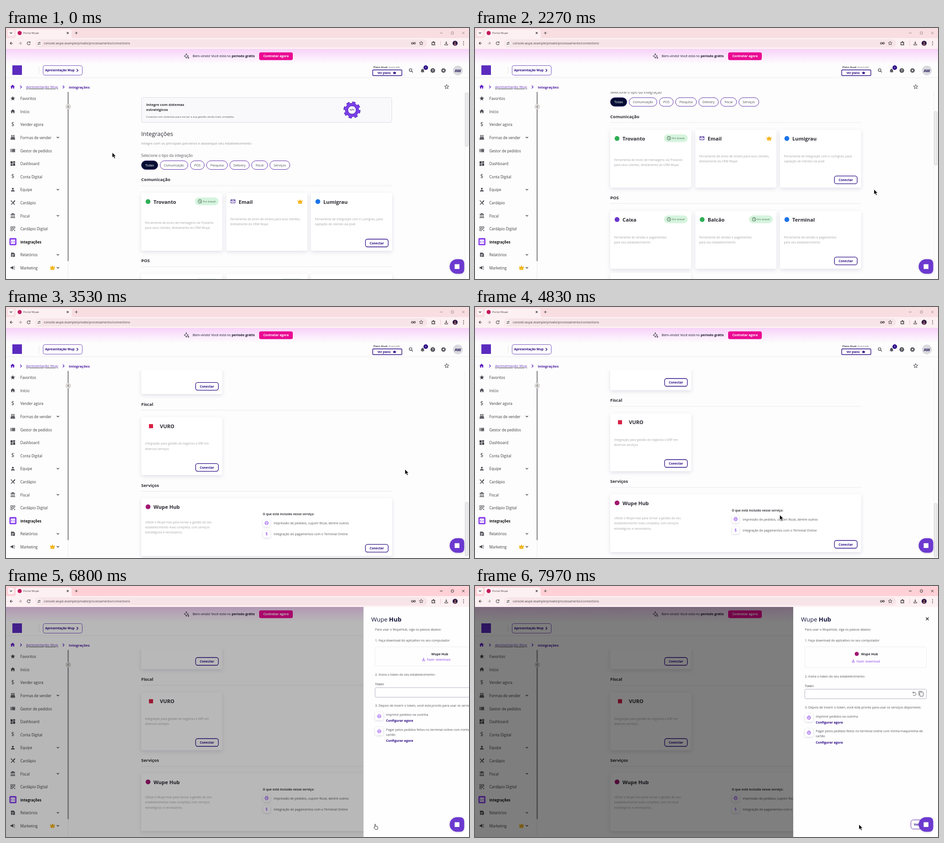
An HTML page that plays this animation: 1017 by 551 pixels, repeating every 8000 ms.

```html
<!DOCTYPE html>
<html lang="pt-BR">
<head>
<meta charset="utf-8">
<title>Integrações</title>
<style>
  html, body { margin: 0; width: 100%; height: 100%; overflow: hidden; }
  svg { display: block; font-family: "Open Sans", "Noto Sans", sans-serif; }
  #stage { width: 1017px; height: 551px; }
  text { white-space: pre; }
  .card { filter: drop-shadow(0 3px 4px #2a206022); }
  .soft { filter: drop-shadow(0 1px 2px #2a206033); }
</style>
</head>
<body>
<svg id="stage" viewBox="0 0 1017 551"></svg>
<script>
const INK = '#2b2b33', GREY = '#55555c', PALE = '#a5a5aa', PURPLE = '#6a35c9', NAVY = '#2c0a85', VIOLET = '#8b45ee';

// y is the visual middle of the text
const text = (x, y, s, size, fill = INK, weight = 400, anchor = 'start') =>
  `<text x="${x}" y="${y + size * .36}" font-size="${size}" fill="${fill}" font-weight="${weight}" text-anchor="${anchor}">${s}</text>`;
const rect = (x1, y1, x2, y2, r, fill, stroke = 'none', w = 1, more = '') =>
  `<rect x="${x1}" y="${y1}" width="${x2 - x1}" height="${y2 - y1}" rx="${r}" fill="${fill}" stroke="${stroke}" stroke-width="${w}" ${more}/>`;
const disc = (x, y, r, fill, more = '') => `<circle cx="${x}" cy="${y}" r="${r}" fill="${fill}" ${more}/>`;
const ring = (x, y, r, stroke, w = 1, more = '') => disc(x, y, r, 'none', `stroke="${stroke}" stroke-width="${w}" ${more}`);
const line = (d, stroke = INK, w = 1, more = '') =>
  `<path d="${d}" fill="none" stroke="${stroke}" stroke-width="${w}" ${more}/>`;
// 24-unit glyph centred on x, y
const icon = (name, x, y, size = 11, fill = '#46464d', more = '') =>
  `<path d="${glyphs[name]}" fill="${fill}" fill-rule="evenodd" transform="translate(${x - size / 2} ${y - size / 2}) scale(${size / 24})" ${more}/>`;
const outline = (name, x, y, size, stroke) => icon(name, x, y, size, 'none', `stroke="${stroke}" stroke-width="2.2"`);
const down = (x, y) => line(`M${x - 2.5} ${y - 1.3}l2.5 2.5 2.5-2.5`, '#333', 1.2);
const right = (x, y, c, w = 1.3) => line(`M${x - 1.3} ${y - 3}l3 3-3 3`, c, w);
const cross = (x, y, r, c, w) => line(`M${x - r} ${y - r}l${2 * r} ${2 * r}m0 ${-2 * r}l${-2 * r} ${2 * r}`, c, w);
const cog = (x, y, r, c) => disc(x, y, r * .82, c) +
  ring(x, y, r * .85, c, r * .3, `stroke-dasharray="${r * .37} ${r * .2976}"`);

const glyphs = {
  star: 'M12 17.3L18.2 21l-1.7-7L22 9.2l-7.2-.6L12 2 9.2 8.6 2 9.2 7.5 14 5.8 21z',
  home: 'M10 20v-6h4v6h5v-8h3L12 3 2 12h3v8z',
  till: 'M5 2h14v7H5zM8 4v3h8V4zM4 11h16l2 7H2zM2 19h20v3H2z',
  list: 'M2 5h4v4H2zM8 5h14v4H8zM2 10h4v4H2zM8 10h14v4H8zM2 15h4v4H2zM8 15h14v4H8z',
  dash: 'M2 13h9V2H2zM2 22h9v-7H2zM13 22h9V11h-9zM13 2v7h9V2z',
  person: 'M12 12a4 4 0 1 0 0-8 4 4 0 0 0 0 8zM4 20v-2c0-3 5-4 8-4s8 1 8 4v2z',
  fork: 'M2 4l3-2 8 9c1-4 5-9 8-9s1 6-6 11l6 7-2 2-7-7-7 7-2-2 8-8z',
  bank: 'M4 10v7h3v-7zM10.5 10v7h3v-7zM17 10v7h3v-7zM2 22h20v-3H2zM12 1L2 6v2h20V6z',
  tiles: 'M2 2h9v9H2zM4 4v5h5V4zM13 2h9v9h-9zM15 4v5h5V4zM2 13h9v9H2zM4 15v5h5v-5zM13 13h4v4h-4zM18 18h4v4h-4z',
  doc: 'M4 3h12l5 5v13H4zM7 9v2h10V9zM7 13v2h10v-2zM7 17v2h6v-2z',
  horn: 'M2 9h5l7-5v16l-7-5H2zM17 11h5v2h-5zM16 7l4-3 1 2-4 3zM17 16l4 3-1 2-4-3z',
  crown: 'M2 5l5 6 5-8 5 8 5-6-2 12H4zM4 18h16v3H4z',
  bell: 'M12 22l3-3H9zM19 16v-5c0-4-2-6-5-7V2h-4v2c-3 1-5 3-5 7v5l-2 2h18z',
  mail: 'M2 4h20v16H2zM4 8v10h16V8l-8 5zM4 6l8 5 8-5z',
  print: 'M6 2h12v5H6zM8 4v3h8V4zM2 8h20v9h-4v5H6v-5H2zM4 10v5h2v-2h12v2h2v-5zM8 15v5h8v-5z',
  save: 'M10.5 2h3v8H18l-6 6-6-6h4.5zM3 15h2.5v4h13v-4H21v7H3z',
  piece: 'M3 6h6c0-5 6-5 6 0h5v6c-4 0-4 4 0 4v5H3zM6 9v9h11v-1c-4-2-4-5 0-7V9z'
};

const button = (x, y) => rect(x, y, x + 50, y + 17, 4.5, '#fff', NAVY, 1.3) +
  text(x + 25, y + 8.7, 'Conectar', 7, NAVY, 700, 'middle');
const bubble = (x, y, r = 8) => `<g class="soft">${rect(x - r, y - r, x + r, y + r, 4, '#fff')}</g>`;
const soon = (x, y) => rect(x, y, x + 52, y + 17, 8.5, '#d5f4dd') + ring(x + 11, y + 8.5, 4, '#3f5a48') +
  line(`M${x + 11} ${y + 6}v3l2 1`, '#3f5a48', .9) + text(x + 18, y + 8.7, 'Em breve!', 6, '#4a6b55');

function browser() {
  const c = '#443c40';
  return rect(0, 0, 1017, 23, 0, '', 'none', 0, 'id="strip"') + rect(0, 22, 1017, 46, 0, '#fdf0f2') +
    rect(4, 4, 18, 18, 4, '#fdf0f2') + down(11, 11) +
    '<path d="M17 22q4 0 4-4V8q0-5 5-5h113q5 0 5 5v10q0 4 4 4z" fill="#fdf0f2"/>' +
    disc(30, 11, 4.5, '#c2185b') + text(38, 11.3, 'Portal Wupe', 6, c) +
    cross(135.5, 11, 2, c, 1.1) + line('M151.5 11h6m-3-3v6', c) +
    '<g id="controls">' + line('M953 11h6', '#222') + rect(978, 8.5, 983, 13.5, 1, 'none', '#222') + cross(1004.5, 11, 2.5, '#222', 1) + '</g>' +
    line('M15 33.5h-6m3-3l-3 3 3 3', c, 1.1) + line('M28 33.5h6m-3-3l3 3-3 3', '#aa9ca0', 1.1) +
    line('M52.5 31.5a3.4 3.4 0 1 0 .6 3m0-5v2.5h-2.5', c, 1.1) +
    rect(64, 25, 925, 42.5, 8.7, '#f6e4e8') + disc(72.5, 33.5, 6, '#fff5f6') +
    line('M69.5 32h3m2.5 0h1m-6.5 3.5h1m2.5 0h3', c) + ring(73.8, 32, 1.1, c, .9) + ring(71.2, 35.5, 1.1, c, .9) +
    text(83, 33.6, 'console.wupe.example/private/processamento/connections', 6.8, '#4a4347') +
    ring(892.5, 33.5, 2, c, 1.2) + ring(897.5, 33.5, 1.8, c, 1.2) + line('M894 33.5h3', c, 1.2) +
    outline('star', 912, 33.3, 10, c) + icon('piece', 939, 33.5, 11, c) + line('M954.5 28v11', '#e6c9cf') +
    icon('save', 967, 33.5, 10, c) + disc(986.5, 33.5, 5.5, '#2a1540') + disc(986.5, 32, 1.7, '#8c5a62') +
    '<path d="M983.5 38q0-4 3-4t3 4z" fill="#8c5a62"/>' +
    [30, 33.5, 37].map(y => disc(1005, y, .9, c)).join('');
}

function header() {
  return rect(0, 46, 1017, 79, 0, 'url(#promo)') +
    line('M396 56q.6 5 5 5.5-4.4.6-5 5-.6-4.400-5-5 4.400-.5 5-5.5zM400.5 63.5v4m-2-2h4', INK, 1) +
    text(410, 61.7, 'Bem-vindo! Você está no <tspan font-weight="700">período grátis</tspan>', 7.3, '#17172b') +
    rect(556, 53.5, 630, 70.5, 4, '#ea0a92') + text(593, 61.8, 'Contratar agora', 7, '#fff', 700, 'middle') +
    rect(14, 82, 35, 103, 0, '#5b2bbf') + line('M72.5 85v16', '#e4e4e8') +
    rect(81.5, 82.5, 167.5, 103.5, 4, '#fdfdfd', '#7a52c0') + text(86, 93, 'Apresentação Wup', 6.9, NAVY, 700) + right(156.5, 93, NAVY) +
    text(807, 86, '<tspan font-weight="600">Plano Atual:</tspan> <tspan fill="#777">Avançado</tspan>', 5.5) +
    rect(805.5, 92, 869.5, 104.5, 1.5, '#fff', NAVY, 1.4) + text(816, 98.4, 'Ver plano', 6.1, NAVY, 700) + icon('crown', 853.5, 98, 8, NAVY) +
    ring(888.7, 92.3, 2.9, GREY, 1.4) + line('M890.7 94.5l3 3', GREY, 1.6) +
    icon('bell', 915, 94, 11, GREY) + disc(922, 87, 5, NAVY) + text(922, 87, '1', 6, '#fff', 600, 'middle') +
    disc(937.5, 93.3, 5.1, GREY) + text(937.5, 93.5, '?', 7.5, '#fff', 700, 'middle') +
    cog(961, 93.3, 5.2, GREY) + disc(961, 93.3, 1.7, '#fdfdfd') +
    disc(992.5, 93.3, 10.7, '#dbd9de') + text(992.5, 93.5, 'AW', 8.8, '#1d1658', 700, 'middle') +
    line('M0 109h1017', '#ececee') + icon('home', 14.5, 129, 12, '#5d1fc0') + right(32.5, 129.5, '#5d1fc0') +
    '<g text-decoration="underline">' + text(44, 129.5, 'Apresentação Wup', 8, '#6d3cc0') + '</g>' +
    right(126, 129.5, '#5d1fc0') + text(138, 129.7, 'Integrações', 7.85, '#4b1a9c', 700) + outline('star', 968, 128.8, 11, GREY);
}

function sidebar() {
  // label, glyph, has submenu
  const items = [['Favoritos', 'star'], ['Início', 'home'], ['Vender agora', '$'], ['Formas de vender', 'till', 1],
    ['Gestor de pedidos', 'list'], ['Dashboard', 'dash'], ['Conta Digital', '$'], ['Equipe', 'person', 1], ['Cardápio', 'fork'],
    ['Fiscal', 'bank', 1], ['Cardápio Digital', 'tiles'], ['Integrações', ''], ['Relatórios', 'doc', 1], ['Marketing', 'horn', 1], ['', 'person']];
  return line('M136.5 140v411', '#e9e9ec') + rect(135, 140, 138, 512, 1.5, '#a2a2a6') +
    disc(136.7, 172.7, 6, '#dcd9d6') + line('M138 170l-2.5 2.7 2.5 2.7', '#333') +
    items.map(([label, glyph, sub], i) => {
      const y = 155 + i * 28.6;
      const mark = glyph == '$' ? text(15, y - .5, '$', 12, '#46464d', 400, 'middle') : glyph ? icon(glyph, 15, y - .5, 12) :
        rect(7.5, y - 8.5, 23, y + 7.5, 2.5, VIOLET) + rect(10.5, y - 5, 20, y + 4.5, 1, '#fff') +
        line(`M14 ${y - 2.5}l-2 2.3 2 2.3m2.5-4.6l2 2.3-2 2.3`, VIOLET, 1.1);
      return mark + text(31.5, y + .3, label, glyph ? 8.1 : 7.9, glyph ? '#3d3d44' : '#111', glyph ? 400 : 700) + (sub ? down(114, y - .5) : '');
    }).join('') + icon('crown', 102, 526, 13, '#f2b010');
}

const heading = (h, s) => text(297, h, s, 9.5, INK, 700) + line(`M297 ${h + 13}h551`, '#e8e8ec');
function card(x, y, title, desc, o = {}) {
  const w = o.wide ? 551 : 178, first = o.at || 58;
  const logo = o.square ? rect(x + 17, y + 15, x + 26, y + 24, 0, '#d81f45') :
    o.dot ? disc(x + (o.gap ? 22 : 15), y + 19, o.gap ? 7 : 5.3, o.dot) : icon('mail', x + 14.5, y + 18.5, 12, NAVY);
  return `<g class="card">${rect(x, y, x + w, y + 127, 4, '#fff')}</g>` + logo +
    text(x + (o.gap || 27), y + 19.7, title, 11.2, INK, 700) +
    desc.map((s, i) => text(x + 8.5, y + first + i * 11.1, s, 6.65, PALE)).join('') +
    (o.link ? button(x + w - 58.5, y + 101.5) : '') + (o.soon ? soon(x + 118, y + 10) : '') +
    (o.crown ? icon('crown', x + 162, y + 19, 13, '#f2b010') : '');
}

function content() {
  const chips = [[297, 334, 'Todas'], [338, 400, 'Comunicação'], [404.5, 436, 'POS'], [440, 487, 'Pesquisa'],
    [491, 535, 'Delivery'], [539, 575, 'Fiscal'], [579, 624, 'Serviços']];
  const A = 297, B = 484, C = 670, pay = ['Ferramenta de vendas e pagamentos', 'para seu estabelecimento'];
  const red = '#d81f45', hub = '#a01870';
  return rect(A + .5, 152.5, 847.5, 207.5, 4, '#f9f9fb', '#dddde5') +
    text(308, 168.3, 'Integre com sistemas', 7.85, INK, 700) + text(308, 179.6, 'estratégicos', 7.85, INK, 700) +
    text(308, 194.5, 'Conecte com sistemas para tornar a sua gestão ainda mais completa', 6, GREY) +
    cog(760, 180, 18.6, '#4d1fae') + cog(760, 180, 17.5, '#7a3fe8') + disc(760, 180, 9, '#fff', 'stroke="#4d1fae"') +
    text(760, 179.7, '&lt;/&gt;', 7, '#33216b', 700, 'middle') +
    text(A, 232.2, 'Integrações', 12.9, INK, 500) +
    text(A, 253.5, 'Integre com os principais parceiros e alavanque seu estabelecimento', 7.55, '#98989d') +
    text(A, 279.8, 'Selecione o tipo da integração', 8.1, GREY) +
    chips.map(([a, b, s], i) => rect(a + .5, 291.5, b - .5, 310.5, 9.5, i ? '#fff' : '#050d33', i ? '#5f2fa8' : '#33246e') +
      text((a + b) / 2, 301.3, s, 7, i ? '#4b4b52' : '#fff', 400, 'middle')).join('') +
    heading(333, 'Comunicação') +
    card(A, 362, 'Trovanto', ['Ferramenta de envio de mensagens via Trovanto', 'para seus clientes, diretamente do CRM Wupe'], { dot: '#2fae55', soon: 1, at: 66 }) +
    card(B, 362, 'Email', ['Ferramenta de envio de emails para seus clientes,', 'diretamente do CRM Wupe'], { crown: 1 }) +
    card(C, 362, 'Lumigrau', ['Ferramenta de integração com o Lumigrau, para', 'captação de clientes via pixel'], { dot: '#1b74e8', link: 1 }) +
    heading(511, 'POS') +
    card(A, 540, 'Caixa', pay, { dot: PURPLE, soon: 1 }) + card(B, 540, 'Balcão', pay, { dot: '#2fae55', soon: 1 }) +
    card(C, 540, 'Terminal', pay, { dot: '#1b74e8', link: 1 }) + card(A, 676, 'Totem', pay, { dot: '#e08a1e', link: 1 }) +
    heading(825, 'Pesquisa') +
    card(A, 853, 'Satisfação', ['Ferramenta de pesquisa de satisfação do cliente.'], { dot: PURPLE, link: 1, at: 47 }) +
    text(305.5, 932.8, 'Saiba mais...', 7, VIOLET, 600) +
    heading(1003, 'Delivery') +
    card(A, 1031.5, 'Gurmo', ['Receba seus pedidos através do portal Wupe com', 'nossa integração com seu painel Gurmo'], { dot: red, gap: 41, link: 1 }) +
    heading(1181, 'Fiscal') +
    card(A, 1209.5, 'VURO', ['Integração para gestão de negócios e ERP em', 'diversos serviços'], { square: 1, gap: 41, link: 1 }) +
    heading(1359, 'Serviços') +
    card(A, 1387, 'Wupe Hub', ['Utilize o Wupe Hub para tornar a gestão do seu', 'estabelecimento mais completa, com serviços', 'estratégicos e necessários.'], { dot: hub, wide: 1, link: 1, at: 53 }) +
    text(564, 1422.5, 'O que está incluído nesse serviço:', 6.75, '#3d3d44', 700) +
    bubble(572.5, 1442) + icon('print', 572.5, 1441.5, 10, VIOLET) + text(588, 1442, 'Impressão de pedidos, cupom fiscal, dentre outros', 7, GREY) +
    bubble(572.5, 1466) + text(572.5, 1465.5, '$', 9.5, VIOLET, 400, 'middle') + text(588, 1466, 'Integração de pagamentos com o Terminal Online', 7, GREY);
}

function drawer() {
  const step = y => bubble(34.5, y, 9) + icon('print', 34.5, y, 10, VIOLET);
  const link = y => text(49.5, y, 'Configurar agora', 7.1, NAVY, 700);
  return rect(0, 46, 330, 551, 0, '#fefefe') +
    text(17, 73, 'Wupe <tspan font-weight="700">Hub</tspan>', 13.2, '#14143a') + cross(294.5, 72, 3, '#222', 1.3) +
    text(25.5, 95.7, 'Para usar o WupeHub, siga os passos abaixo:', 6.95, GREY) +
    text(25.5, 119.5, '1. Faça download do aplicativo no seu computador', 6.95, GREY) +
    rect(25.5, 133.5, 292.5, 179, 3, '#fefefe', '#ededf1', 1, 'id="box"') +
    disc(139.5, 149, 4.5, '#a01870', 'id="hubDot"') + text(149, 149, 'Wupe Hub', 7.2, INK, 700) +
    '<g id="lower">' + icon('save', 132, 164.5, 8, VIOLET) + text(139, 165, 'Fazer download', 7, VIOLET) +
    text(25.5, 198, '2. Insira o token do seu estabelecimento:', 6.95, GREY) + text(25.5, 219, 'Token', 7.1, '#3d3d44') +
    rect(25.5, 226.5, 292.5, 247.5, 2, '#fff', '#b3b0c4') +
    line('M263 235a3.6 3.6 0 1 1 0 4m0-7v3h3', GREY, 1) +
    rect(278, 233, 285.5, 242, 1, '#fff', GREY) + line('M276 240v-9h7', GREY) +
    text(25.5, 266, '3. Depois de inserir o token, você está pronto para usar os serviços disponíveis:', 6.95, GREY) +
    step(289) + text(49.5, 286, 'Imprimir pedidos na cozinha', 6.95, GREY) + link(299) +
    step(322) + text(49.5, 318.7, 'Pagar pelos pedidos feitos no terminal online com minha maquininha de', 6.95, GREY) +
    text(49.5, 329.7, 'cartão', 6.95, GREY) + link(343) + '</g>' +
    rect(258.5, 513.5, 300, 533.5, 5, '#fff', '#5f2fa8') + text(265, 523.5, 'Voltar', 7.1, NAVY, 700);
}

stage.innerHTML = `<defs><linearGradient id="promo" x2="0" y2="1">
  <stop stop-color="#f6d2f9"/><stop offset=".55" stop-color="#fbeafc"/><stop offset="1" stop-color="#fdfdfd"/></linearGradient></defs>` +
  rect(0, 0, 1017, 551, 0, '#fdfdfd') + browser() + header() + sidebar() +
  `<svg y="140" width="1017" height="411" viewBox="0 140 1017 411"><g id="page">${content()}</g></svg>` +
  line('M1008 140v411', '#efeff1') + rect(1009, 142, 1015, 260, 3, '#ececee', '#c4c4c8', .8, 'id="thumb"') +
  rect(0, 46, 1017, 551, 0, '#000', 'none', 0, 'id="shade"') + `<g id="drawer">${drawer()}</g>` +
  '<g class="soft"><path d="M990.5 507.5h6q10 0 10 10v12q0 10-10 10h-6a16 16 0 0 1 0-32z" fill="#6c39cf"/></g>' + rect(985.5, 518.5, 996, 529, 0, '#fff') +
  `<g id="cursor"><path id="arrow" d="M0 0v11l2.6-2.3 2 4.3 1.9-.9-2-4.1h3.4z" fill="#000" stroke="#fff" stroke-width=".6"/>
  <path id="hand" d="M-1.5 1q1-1.5 2 0v4l4 .7q1 .3 1 1.5l-.8 4.8h-5l-3-4q0-1.500 1.8-.5z" fill="#fff" stroke="#222" stroke-width=".9"/></g>`;

const el = id => document.getElementById(id);
const set = (id, name, value) => el(id).setAttribute(name, value);
const show = (id, on) => set(id, 'visibility', on ? 'visible' : 'hidden');
const clamp = v => Math.min(1, Math.max(0, v));
const smooth = v => v * v * (3 - 2 * v);
const ramp = (t, a, b) => smooth(clamp((t - a) / (b - a)));

// cubic-bezier(x1, 0, x2, 1)
function bezier(x1, x2, x) {
  let lo = 0, hi = 1;
  for (let i = 0; i < 20; i++) {
    const s = (lo + hi) / 2, r = 1 - s;
    if (3 * r * r * s * x1 + 3 * r * s * s * x2 + s ** 3 < x) lo = s; else hi = s;
  }
  return smooth(hi);
}

function draw() {
  const t = performance.now() % 8000;
  const scroll = 742 * ramp(t, 2050, 2850) + 234 * ramp(t, 3000, 3600);
  set('page', 'transform', `translate(0 ${-scroll})`);
  set('thumb', 'y', 142 + scroll * 289 / 976);

  const go = ramp(t, 400, 1500), back = ramp(t, 3700, 4700), aim = ramp(t, 5100, 6100), leave = ramp(t, 7000, 7500);
  const x = 233.4 + 643 * go - 207 * back + 142 * aim + 32 * leave;
  const y = 273.4 + 80 * go + 3 * ramp(t, 2000, 2800) + 100 * back + 66 * aim + leave;
  set('cursor', 'transform', `translate(${x} ${y})`);
  const pointing = t > 5900 && t < 7030;
  show('hand', pointing);
  show('arrow', !pointing);

  const open = clamp((t - 6717) / 225), loaded = t > 6960;
  set('drawer', 'transform', `translate(${1017 - 318 * bezier(0, .2, open)} 0)`);
  set('shade', 'opacity', .5 * bezier(.4, .2, open));
  set('lower', 'transform', `translate(0 ${loaded ? 0 : -3.3})`);
  set('box', 'height', loaded ? 45.5 : 42);
  show('hubDot', loaded);

  const active = t > 6000;
  set('strip', 'fill', active ? '#ffd0d6' : '#f8dde1');
  set('controls', 'opacity', active ? 1 : .45);
  requestAnimationFrame(draw);
}
draw();
</script>
</body>
</html>
```
